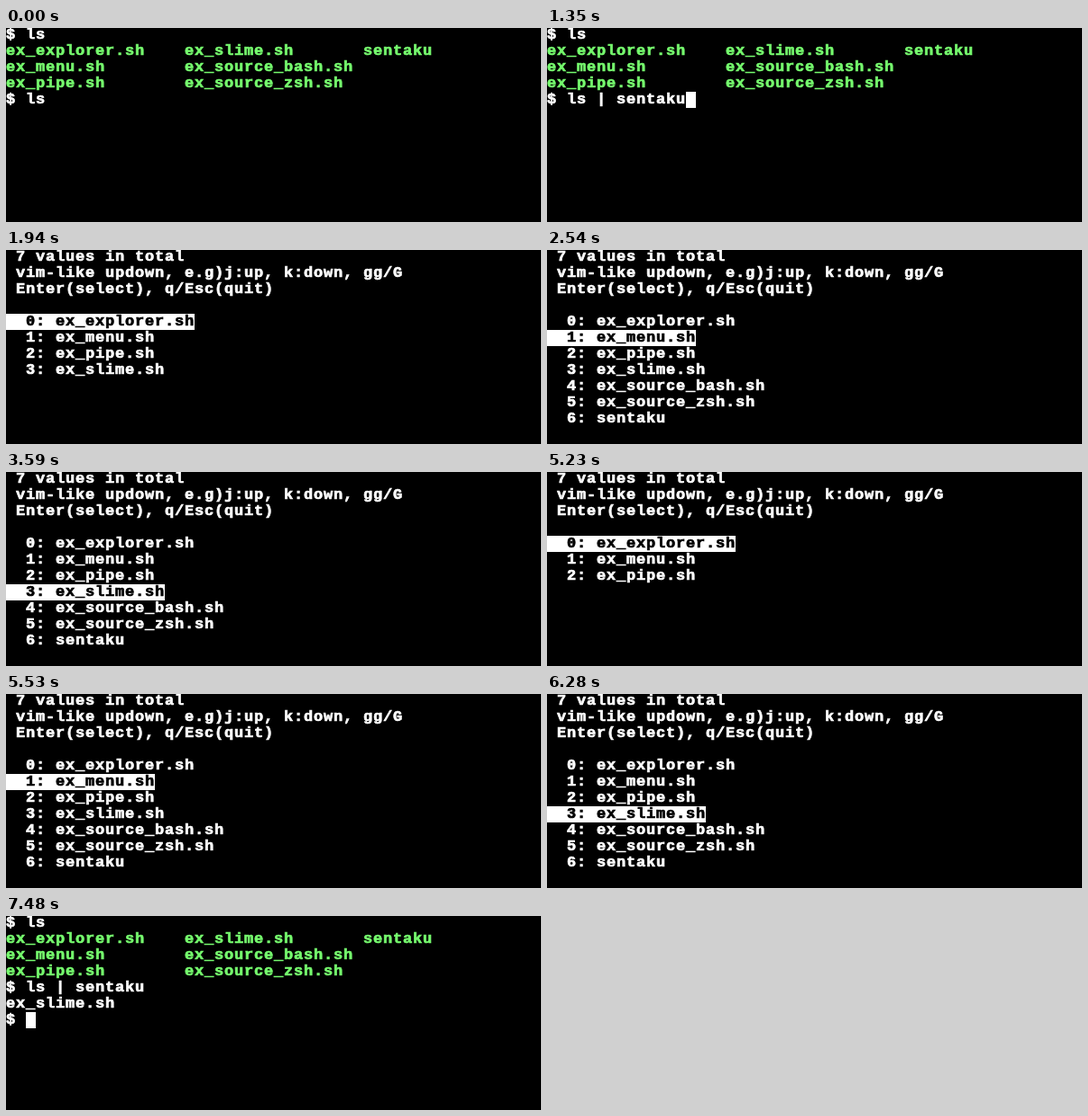
An HTML page that plays this animation: 593x216 px, repeating every 8 s.

```html
<!DOCTYPE html>
<html lang="en">
<head>
<meta charset="utf-8">
<title>Terminal menu</title>
<style>
  html, body { margin: 0; width: 100%; height: 100%; overflow: hidden; background: #000; }
  #screen {
    position: absolute; top: -1px; left: 0; color: #fff;
    font: bold 17px/18px "Liberation Mono", "Courier New", monospace;
    letter-spacing: calc(11px - 1ch);
    font-variant-ligatures: none;
    -webkit-text-stroke: 0.7px; /* heavier terminal bold */
  }
  #screen div { height: 18px; white-space: pre; }
  .green { color: #76fb6e; }
  .inv { display: inline-block; height: 18px; vertical-align: top; background: #fff; color: #000; }
</style>
</head>
<body>
<div id="screen"></div>
<script>
const LOOP = 8000;
const files = ["ex_explorer.sh", "ex_menu.sh", "ex_pipe.sh", "ex_slime.sh",
  "ex_source_bash.sh", "ex_source_zsh.sh", "sentaku"];
const command = "$ ls | sentaku";
const help = [" 7 values in total", " vim-like updown, e.g)j:up, k:down, gg/G",
  " Enter(select), q/Esc(quit)", ""];

const span = (cls, text) => `<span class="${cls}">${text}</span>`;
const cursor = span("inv", " ");

// The shell: a three-column listing, then the given lines
const listing = [0, 1, 2].map(row =>
  span("green", [0, 3, 6].map(col => (files[row + col] || "").padEnd(18)).join("")));
const shell = (...lines) => ["$ ls", ...listing, ...lines];
const typed = n => shell(command.slice(0, n) + cursor);
const result = mark => shell(command, files[3], "$ " + mark);

// The menu, with only the first `shown` entries painted
const menu = (selected, shown = files.length) => [...help,
  ...files.slice(0, shown).map((name, i) => {
    const line = `  ${i}: ${name}`;
    return i === selected ? span("inv", line) : line;
  })];

const steps = [
  [0, shell("$ ls")],
  [150, typed(6)], [450, typed(7)], [750, typed(8)], [900, typed(9)],
  [1050, typed(10)], [1200, typed(12)], [1350, typed(14)],
  [1940, menu(0, 4)], [2090, menu(0)],
  [2540, menu(1)], [3290, menu(2)], [3590, menu(3)], [4490, menu(6)],
  [5230, menu(0, 3)], [5380, menu(0)],
  [5530, menu(1)], [5830, menu(2)], [6280, menu(3)],
  [6880, result("")], [7480, result(cursor)]
];

const screenEl = document.getElementById("screen");
const start = performance.now();
let current;

function draw() {
  const t = Math.max(0, performance.now() - start) % LOOP;
  const step = steps.findLast(([time]) => time <= t);
  if (step !== current) {
    current = step;
    screenEl.innerHTML = step[1].map(line => `<div>${line}</div>`).join("");
  }
  requestAnimationFrame(draw);
}
draw();
</script>
</body>
</html>
```
